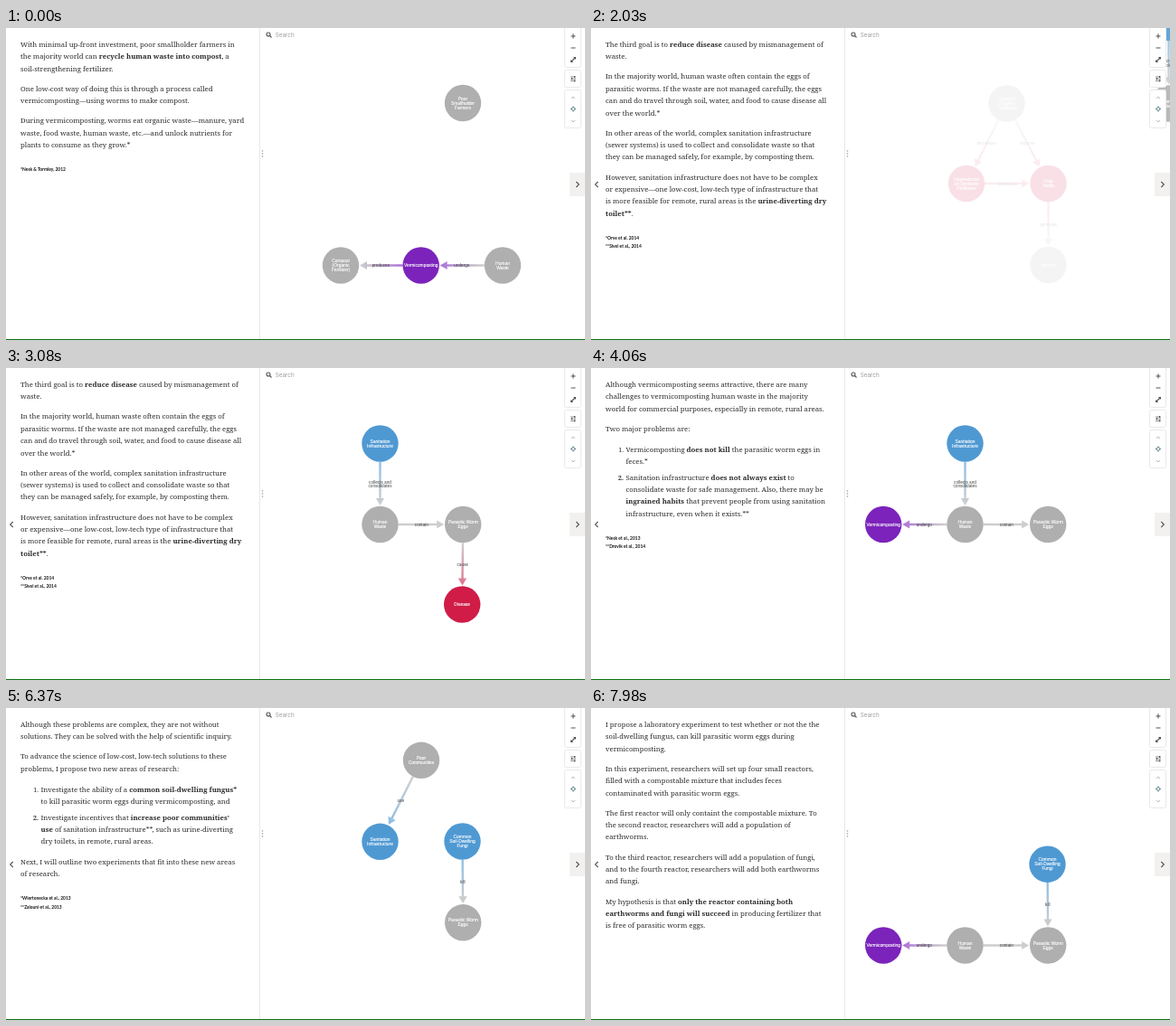
Write an HTML page that moves like this. It is 640 px wide and 345 px high and loops after 8000 ms.

```html
<!DOCTYPE html>
<html lang="en">
<head>
<meta charset="utf-8">
<title>Composting system map</title>
<style>
html, body { margin: 0; width: 100%; height: 100%; overflow: hidden; background: #fff; }
#stage { position: relative; width: 640px; height: 345px; overflow: hidden; background: #fff; }
svg { position: absolute; left: 0; top: 0; }
svg text { font-family: "Liberation Sans", Arial, sans-serif; text-anchor: middle; }
.node text { font-size: 4.9px; fill: #fff; stroke: #fff; stroke-width: .12px; }
.edge text { font-size: 4.7px; fill: #444; }
.panel { position: absolute; left: 0; top: 0; width: 280px; height: 344px; background: #fff; }
article { position: absolute; left: 16px; top: 11.9px; white-space: nowrap; color: #2b2b2b;
  font: 7.75px/13.35px "Noto Serif", serif; }
article[hidden] { display: none; }
p, ol { margin: 0 0 8.9px; }
ol { padding: .6px 0 0 22.5px; list-style: none; counter-reset: n; }
li { position: relative; counter-increment: n; }
li + li { margin-top: 4.4px; }
li::before { content: counter(n) "."; position: absolute; right: 100%; margin-right: 2.5px; font-size: 7px; }
li + li::before { font-weight: 600; }
footer { margin-top: 15.5px; color: #111; font: 700 4.9px/9.8px Lato, sans-serif; }
.icon { fill: none; stroke: #555; stroke-width: 1.1; }
.box { fill: #fff; stroke: #e9e9e9; }
</style>
</head>
<body>
<div id="stage">
  <svg width="640" height="345" viewBox="0 0 640 345">
    <defs id="defs"></defs>
    <g id="map"></g>
  </svg>

  <div class="panel">
    <article>
      <p>With minimal up-front investment, poor smallholder farmers in<br>the majority world can <b>recycle human waste into compost</b>, a<br>soil-strengthening fertilizer.</p>
      <p>One low-cost way of doing this is through a process called<br>vermicomposting—using worms to make compost.</p>
      <p>During vermicomposting, worms eat organic waste—manure, yard<br>waste, food waste, human waste, etc.—and unlock nutrients for<br>plants to consume as they grow.*</p>
      <footer>*Nesk &amp; Tormley, 2012</footer>
    </article>
    <article hidden>
      <p>This recycling system achieves <b>three</b> desirable goals. Two of these<br>three goals are:</p>
      <ol>
        <li>Improve crop yields for poor farmers,</li>
        <li>Decrease the dependence of poor farmers on synthetic<br>fertilizers.</li>
      </ol>
      <p>Compost, a type of fertilizer, <b>improves the quality and quantity</b><br>of plant yields for poor farmers. Fertilizers can increase poor<br>farmers’ income by as much as <b>60</b>%.*</p>
      <p>Compost <b>decreases dependence on synthetic fertilizers</b>,<br>because poor smallholder farmers can use it in addition to or as a<br>substitute for synthetic fertilizer, which is expensive and can<br>decrease future yields if misused.**</p>
      <footer>*Brenk et al., 2009<br>**Far Loam Pool, 2015; 2014</footer>
    </article>
    <article hidden>
      <p>The third goal is to <b>reduce disease</b> caused by mismanagement of<br>waste.</p>
      <p>In the majority world, human waste often contain the eggs of<br>parasitic worms. If the waste are not managed carefully, the eggs<br>can and do travel through soil, water, and food to cause disease all<br>over the world.*</p>
      <p>In other areas of the world, complex sanitation infrastructure<br>(sewer systems) is used to collect and consolidate waste so that<br>they can be managed safely, for example, by composting them.</p>
      <p>However, sanitation infrastructure does not have to be complex<br>or expensive—one low-cost, low-tech type of infrastructure that<br>is more feasible for remote, rural areas is the <b>urine-diverting dry<br>toilet**</b>.</p>
      <footer>*Orve et al. 2014<br>**Sivel et al., 2014</footer>
    </article>
    <article hidden>
      <p>Although vermicomposting seems attractive, there are many<br>challenges to vermicomposting human waste in the majority<br>world for commercial purposes, especially in remote, rural areas.</p>
      <p>Two major problems are:</p>
      <ol>
        <li>Vermicomposting <b>does not kill</b> the parasitic worm eggs in<br>feces.*</li>
        <li>Sanitation infrastructure <b>does not always exist</b> to<br>consolidate waste for safe management. Also, there may be<br><b>ingrained habits</b> that prevent people from using sanitation<br>infrastructure, even when it exists.**</li>
      </ol>
      <footer>*Nesk et al., 2013<br>**Drovik et al., 2014</footer>
    </article>
    <article hidden>
      <p>Although these problems are complex, they are not without<br>solutions. They can be solved with the help of scientific inquiry.</p>
      <p>To advance the science of low-cost, low-tech solutions to these<br>problems, I propose two new areas of research:</p>
      <ol>
        <li>Investigate the ability of a <b>common soil-dwelling fungus*</b><br>to kill parasitic worm eggs during vermicomposting, and</li>
        <li>Investigate incentives that <b>increase poor communities’<br>use</b> of sanitation infrastructure**, such as urine-diverting<br>dry toilets, in remote, rural areas.</li>
      </ol>
      <p>Next, I will outline two experiments that fit into these new areas<br>of research.</p>
      <footer>*Wiertonecka et al., 2013<br>**Zalouni et al., 2013</footer>
    </article>
    <article hidden>
      <p>I propose a laboratory experiment to test whether or not the the<br>soil-dwelling fungus, can kill parasitic worm eggs during<br>vermicomposting.</p>
      <p>In this experiment, researchers will set up four small reactors,<br>filled with a compostable mixture that includes feces<br>contaminated with parasitic worm eggs.</p>
      <p>The first reactor will only containt the compostable mixture. To<br>the second reactor, researchers will add a population of<br>earthworms.</p>
      <p>To the third reactor, researchers will add a population of fungi,<br>and to the fourth reactor, researchers will add both earthworms<br>and fungi.</p>
      <p>My hypothesis is that <b>only the reactor containing both<br>earthworms and fungi will succeed</b> in producing fertilizer that<br>is free of parasitic worm eggs.</p>
    </article>
  </div>

  <svg width="640" height="345" viewBox="0 0 640 345">
    <path d="M280.5 0V344" stroke="#e8e8e8"/>
    <g fill="#999"><circle cx="283.5" cy="136" r=".8"/><circle cx="283.5" cy="139" r=".8"/><circle cx="283.5" cy="142" r=".8"/></g>
    <g class="icon"><circle cx="290" cy="7" r="2"/><path d="M291.5 8.5l2 2"/></g>
    <text x="308.2" y="10" style="font:6.3px Inter,sans-serif" fill="#999">Search</text>

    <rect class="box" x="617.5" y="-2.5" width="18" height="46" rx="2"/>
    <rect class="box" x="617.5" y="46.5" width="18" height="19" rx="2"/>
    <rect class="box" x="617.5" y="68.5" width="18" height="42" rx="2"/>
    <g class="icon">
      <path d="M624.5 9h5M627 6.5v5M624.5 22h5M625 37l4-4M624.6 35.5v2h2M627.4 32.5h2v2"/>
      <path d="M624 54h6M624 56.2h6M624 58.4h6" stroke-width=".7"/>
      <path d="M628.5 53v2M625.5 55.2v2M628.5 57.4v2" stroke-width="1"/>
      <path d="M625 78l2-2 2 2M625 102l2 2 2-2" stroke="#aaa" stroke-width=".8"/>
      <g stroke="#5b8088" stroke-width=".9"><circle cx="627" cy="89.5" r="1.8"/><path d="M627 86.4v1.6M627 91v1.6M623.9 89.5h1.6M628.5 89.5h1.6"/></g>
    </g>
    <rect x="623" y="160" width="17" height="26" fill="#f2f1ef"/>
    <path class="icon" d="M630.3 170l3 3-3 3"/>
    <path class="icon" id="back" d="M7.7 170l-3 3 3 3"/>
    <rect y="344" width="640" height="1" fill="#0c7010"/>
  </svg>
</div>

<script>
const LOOP = 8000, FADE = 300, PAN = 1010, R = 20.2;
const GRAY = '#afafaf', PURPLE = '#7c23bb', RED = '#d01c47', BLUE = '#4f99d3';

const swaps = [0, 60, 1770, 3700, 5465, 7620];
const pans = [
  { at: 335, to: [89.5, -179] },
  { at: 2048, to: [-135.5, -89.5] },
  { at: 5740, to: [-135.5, 0] }
];

// name: [x, y, colour, slides it belongs to, label]
const nodes = {
  farmers: [505, 83, GRAY, '1', 'Poor|Smallholder|Farmers'],
  compost: [370, 262.5, GRAY, '12', 'Compost|(Organic|Fertilizer)'],
  vermi: [458.7, 262.5, PURPLE, '146', 'Vermicomposting'],
  human: [549, 262.5, GRAY, '1346', 'Human|Waste'],
  depend: [325.5, 351, RED, '2', 'Dependence|on Synthetic|Fertilizers'],
  crop: [416, 351, RED, '2', 'Crop|Yields'],
  income: [416, 441, GRAY, '2', 'Income'],
  sanit: [549, 173, BLUE, '345', 'Sanitation|Infrastructure'],
  eggs: [640.7, 262.5, GRAY, '3456', 'Parasitic Worm|Eggs'],
  disease: [639.7, 351, RED, '3', 'Disease'],
  fungi: [640, 172.7, BLUE, '56', 'Common|Soil-Dwelling|Fungi'],
  people: [594.5, 83, GRAY, '5', 'Poor|Communities']
};
const edges = [
  ['vermi', 'compost', 'produces'], ['human', 'vermi', 'undergo'],
  ['compost', 'depend', 'decreases'], ['compost', 'crop', 'improve'],
  ['depend', 'crop', 'decreases'], ['crop', 'income', 'generate'],
  ['sanit', 'human', 'collects and|consolidates'], ['human', 'eggs', 'contain'],
  ['eggs', 'disease', 'cause'], ['people', 'sanit', 'use'], ['fungi', 'eggs', 'kill']
];

const $ = id => document.getElementById(id);
const map = $('map'), back = $('back'), articles = document.querySelectorAll('article');
const parts = [];

function add(parent, tag, attrs) {
  const el = document.createElementNS('http://www.w3.org/2000/svg', tag);
  for (const k in attrs) el.setAttribute(k, attrs[k]);
  return parent.appendChild(el);
}

function label(parent, text, x, y, step) {
  const lines = text.split('|');
  lines.forEach((line, i) => {
    const dy = (i - (lines.length - 1) / 2) * step + 1.7;
    add(parent, 'text', { x, y: y + dy }).textContent = line;
  });
}

function group(cls, slides) {
  const el = add(map, 'g', { class: cls });
  parts.push({ el, slides });
  return el;
}

edges.forEach(([from, to, text], i) => {
  const [x1, y1, c1, s1] = nodes[from], [x2, y2, c2, s2] = nodes[to];
  const g = group('edge', [...s1].filter(s => s2.includes(s)).join(''));
  const grad = add($('defs'), 'linearGradient', { id: 'g' + i, gradientUnits: 'userSpaceOnUse', x1: 0, y1: -1, x2: Math.hypot(x2 - x1, y2 - y1), y2: -1 });
  add(grad, 'stop', { offset: .25, 'stop-color': c1 });
  add(grad, 'stop', { offset: .75, 'stop-color': c2 });
  const end = Math.hypot(x2 - x1, y2 - y1) - R - .8, neck = end - 8;
  add(g, 'path', {
    d: `M${R} -1.2H${neck}V-4.6L${end} 0L${neck} 4.6V1.2H${R}Z`,
    fill: `url(#g${i})`, opacity: .62,
    transform: `translate(${x1} ${y1}) rotate(${Math.atan2(y2 - y1, x2 - x1) * 180 / Math.PI})`
  });
  label(g, text, (x1 + x2) / 2, (y1 + y2) / 2, 4.8);
});

for (const [x, y, fill, slides, text] of Object.values(nodes)) {
  const g = group('node', slides);
  add(g, 'circle', { cx: x, cy: y, r: R, fill });
  label(g, text, x, y, 5);
}

const clamp = v => Math.min(1, Math.max(0, v));
const ease = p => p < .5 ? 2 * p * p : 1 - 2 * (1 - p) ** 2;

function draw(now) {
  const t = now % LOOP;
  const cur = swaps.filter(s => s <= t).length;
  const prev = Math.max(1, cur - 1);

  articles.forEach((a, i) => { a.hidden = i !== cur - 1; });
  back.style.display = cur > 1 ? '' : 'none';

  const f = clamp((t - swaps[cur - 1]) / FADE);
  for (const { el, slides } of parts) {
    const a = +slides.includes(prev), b = +slides.includes(cur);
    const o = a + (b - a) * f;
    el.style.display = o ? '' : 'none';
    el.style.opacity = o;
  }

  let x = 0, y = 0;
  for (const { at, to } of pans) {
    const p = ease(clamp((t - at) / PAN));
    x += (to[0] - x) * p;
    y += (to[1] - y) * p;
  }
  map.setAttribute('transform', `translate(${x} ${y})`);
}

function tick(now) {
  draw(now);
  requestAnimationFrame(tick);
}
draw(0);
requestAnimationFrame(tick);
</script>
</body>
</html>
```
